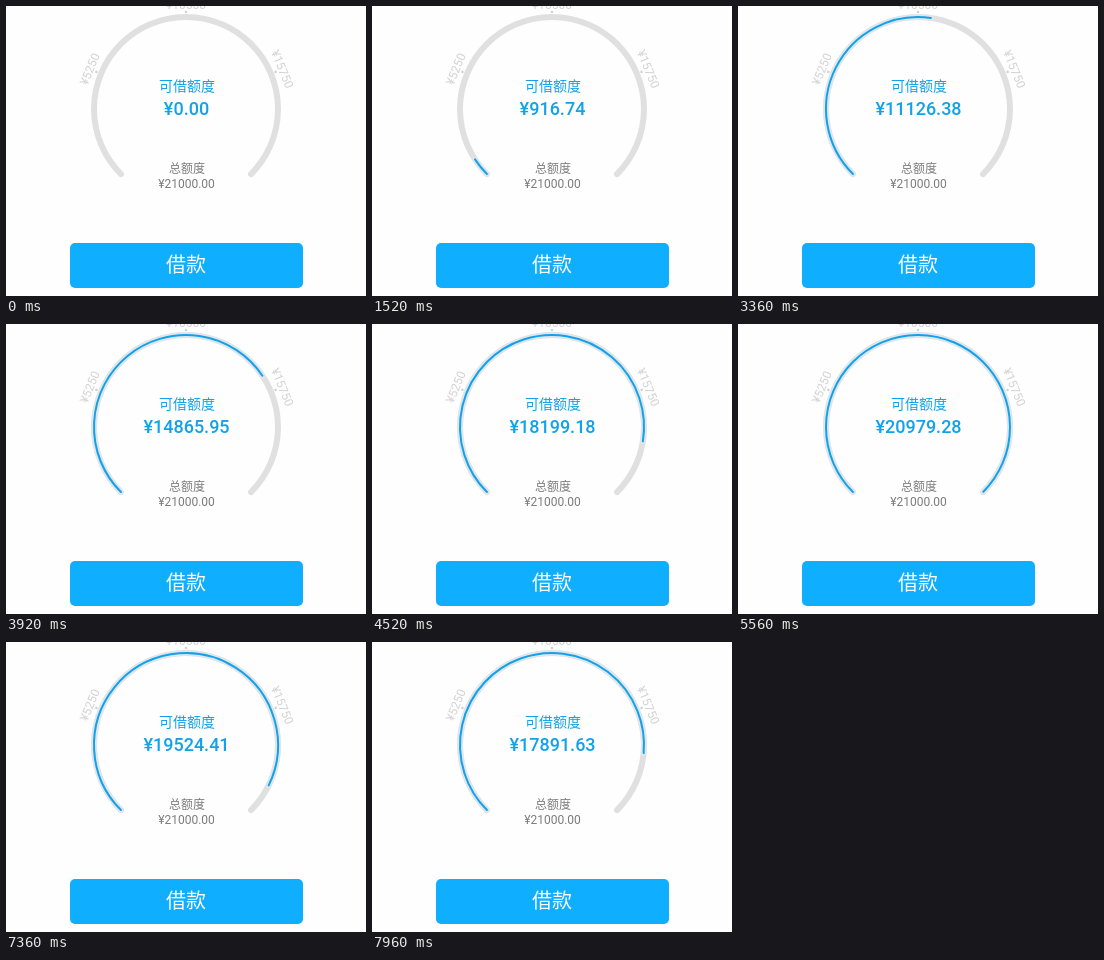
Animation, 360 px wide and 290 px high, one loop 8000 ms. Source, as an HTML page:

```html
<!DOCTYPE html>
<html lang="zh-CN">
<head>
<meta charset="utf-8">
<style>
  html, body { margin: 0; width: 100%; height: 100%; overflow: hidden; background: #fefefe; }
  svg { display: block; width: 360px; height: 290px; }
  text { font-family: Roboto, "Noto Sans CJK SC", "Noto Sans CJK", sans-serif; text-anchor: middle; }
  path { fill: none; stroke-linecap: round; }
  .marks { font-size: 12px; fill: #d2d2d2; }
  .accent { fill: #12a2ea; }
  .total { font-size: 12px; fill: #7c7c7c; }
</style>
</head>
<body>
<svg viewBox="0 0 360 290">
  <path id="track" stroke="#e0e0e0" stroke-width="6"/>
  <path id="halo" stroke="#dfe6ec" stroke-width="5.5"/>
  <path id="bar" stroke="#12a2ea" stroke-width="2"/>
  <g class="marks" id="marks"></g>
  <text class="accent" x="181" y="85.3" font-size="14">可借额度</text>
  <text class="accent" id="amount" x="180.5" y="109" font-size="18" font-weight="500"></text>
  <text class="total" x="181" y="166.6">总额度</text>
  <text class="total" x="180.5" y="182">¥21000.00</text>
  <rect x="64" y="237" width="233" height="45" rx="5" fill="#10aefe"/>
  <text x="180" y="266" font-size="20" fill="#fff">借款</text>
</svg>
<script>
const LOOP = 8000, STEP = 40, TOTAL = 21000, LOWER = 11000;
const CX = 180, CY = 103, RADIUS = 92, START = 135, SWEEP = 270;
const byId = id => document.getElementById(id);

function arc(fraction) {
  const point = degrees => {
    const a = degrees * Math.PI / 180;
    return `${CX + RADIUS * Math.cos(a)} ${CY + RADIUS * Math.sin(a)}`;
  };
  const sweep = SWEEP * fraction;
  return `M${point(START)}A${RADIUS} ${RADIUS} 0 ${+(sweep > 180)} 1 ${point(START + sweep)}`;
}

// Eased progress of a 2000 ms tween, played back in slow 40 ms steps.
function progress(elapsed) {
  const step = Math.max(0, Math.floor(elapsed / STEP));
  const ms = Math.min(2000, Math.floor(step * 16.755));
  return (1 - Math.cos(Math.PI * ms / 2000)) / 2;
}

function draw(now) {
  const t = now % LOOP;
  const value = TOTAL * progress(t - 880) - (TOTAL - LOWER) * progress(t - 6160);
  byId("amount").textContent = "¥" + value.toFixed(2);
  const d = value > 0 ? arc(value / TOTAL) : "";
  byId("halo").setAttribute("d", d);
  byId("bar").setAttribute("d", d);
  requestAnimationFrame(draw);
}

byId("track").setAttribute("d", arc(1));
byId("marks").innerHTML = [1, 2, 3].map(i => `
  <g transform="rotate(${(i - 2) * SWEEP / 4} ${CX} ${CY})">
    <circle cx="${CX}" cy="${CY - 97}" r="1.3"/>
    <text x="${CX}" y="${CY - 100}">¥${TOTAL * i / 4}</text>
  </g>`).join("");
requestAnimationFrame(draw);
</script>
</body>
</html>
```
